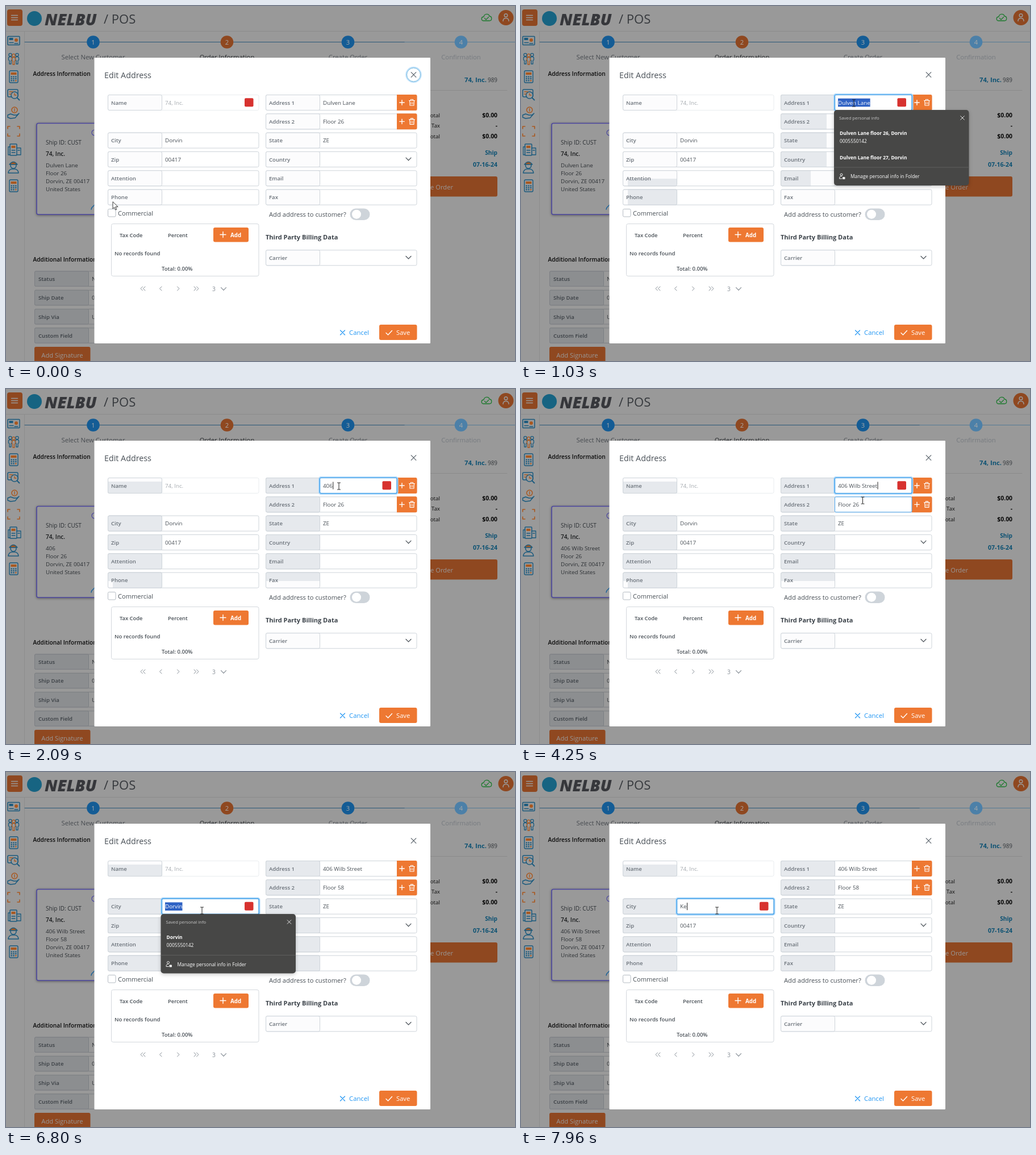
An HTML page for the animation above (8000 ms loop, 896 px wide and 625 px high).

```html
<!DOCTYPE html>
<html lang="en">
<head>
<meta charset="utf-8">
<title>Edit Address</title>
<style>
html, body { margin: 0; width: 100%; height: 100%; overflow: hidden; background: #999; }
svg { display: block; width: 896px; height: 625px; }
text { font-family: "Open Sans", "Noto Sans", sans-serif; white-space: pre; }
.popup { filter: drop-shadow(0 2px 3px rgba(0, 0, 0, .22)); }
</style>
</head>
<body>
<svg id="stage" viewBox="0 0 896 625"></svg>
<script>
const LOOP = 8000;
const ORANGE = '#ee7832', DIM_ORANGE = '#8f4820', DIM_BLUE = '#145c95', LINK = '#0d5273';
const ICON_BLUE = '#1a5a7e', ICON_ORANGE = '#a9581f';
const INK = '#495057', DIM_INK = '#2c3034', DIM_WHITE = '#999', EDGE = '#ced4da';
const COMPANY = '74, Inc.', CITY = 'Dorvin', STREET = 'Dulven Lane', PHONE = '0005550142';

const rect = (x, y, w, h, fill, stroke = 'none', r = 0, extra = '') =>
  `<rect x="${x}" y="${y}" width="${w}" height="${h}" rx="${r}" fill="${fill}" stroke="${stroke}" ${extra}/>`;
const circle = (x, y, r, fill, stroke = 'none', w = 1) =>
  `<circle cx="${x}" cy="${y}" r="${r}" fill="${fill}" stroke="${stroke}" stroke-width="${w}"/>`;
const path = (d, stroke, w = 1, fill = 'none') =>
  `<path d="${d}" stroke="${stroke}" stroke-width="${w}" fill="${fill}" stroke-linecap="round" stroke-linejoin="round"/>`;
const text = (x, y, str, size = 9.8, fill = INK, weight = 400, anchor = 'start', extra = '') =>
  `<text x="${x}" y="${y}" font-size="${size}" fill="${fill}" font-weight="${weight}" text-anchor="${anchor}" ${extra}>${str}</text>`;
const cross = (x, y, r, color, w = 1.2) =>
  path(`M${x - r} ${y - r}l${2 * r} ${2 * r}m0 ${-2 * r}l${-2 * r} ${2 * r}`, color, w);
const plus = (x, y, r, color, w = 1.4) =>
  path(`M${x - r} ${y}h${2 * r}M${x} ${y - r}v${2 * r}`, color, w);
const chevron = (x, y, color = INK) => path(`M${x - 4.5} ${y - 2.3}l4.5 4.6l4.5 -4.6`, color, 1.2);

// ---- page behind the dialog ----
function header() {
  const person = path('M875 26.5q0-5 5-5t5 5', DIM_WHITE, 1.5) + circle(880, 16.5, 2.8, 'none', DIM_WHITE, 1.5);
  return path('M0 44.5H896', '#8b8b8b') + path('M32.5 45V625', '#8d8d8d')
    + rect(2, 6, 27, 29, DIM_ORANGE, 'none', 4)
    + path('M9.5 16.5h11M9.5 20.5h11M9.5 24.5h11', DIM_WHITE, 1.4)
    + circle(50, 22, 13, '#176482')
    + text(68, 34, 'NELBU', 28.5, '#36373b', 800, 'start', 'font-style="italic"')
    + text(172, 31, '/ POS', 22, '#36393d')
    + path('M841 26c-5 0-5-7 0-7c1-6 9-6 10-1c5 0 5 8 0 8z', '#1b7a2c', 1.3)
    + path('M842.5 21.5l2.5 2.5l4.5-4.5', '#1b7a2c', 1.2)
    + circle(880, 20.5, 13.5, DIM_ORANGE) + person;
}

function sidebar() {
  const b = ICON_BLUE, o = ICON_ORANGE;
  const calculator = y => rect(6, y - 10, 15, 21, 'none', b, 2, 'stroke-width="1.4"')
    + rect(8.5, y - 7, 10, 4, o)
    + [0, 1, 2].map(r => [0, 1, 2].map(c => rect(8.5 + c * 3.8, y - 0.5 + r * 3.4, 2.4, 2.2, r + c === 4 ? o : b)).join('')).join('');
  const body = (x, y, c) => circle(x, y - 6, 2.6, 'none', c, 1.3)
    + path(`M${x - 3} ${y + 3}v-4q3-4 6 0v4l-1.5 1v6h-3v-6z`, c, 1.3);
  return rect(3, 53.5, 21, 15, 'none', b, 1, 'stroke-width="1.5"') + rect(5.5, 56, 7, 4, b) + circle(18, 60, 3, o)
    + path('M6 64.5h7M15 66h6', b, 1.4)
    + body(7.5, 92, b) + body(19.5, 92, b) + body(13.5, 93, o)
    + calculator(124)
    + rect(3, 147, 18, 13, 'none', b, 2, 'stroke-width="1.5"') + circle(15, 157, 6, '#999', b, 1.5)
    + path('M15 154v3h3', o, 1.4) + path('M19.5 161.5l4 4', b, 1.8) + path('M6 151h6M6 155h3', o, 1.3)
    + circle(15, 183, 5, 'none', o, 1.5) + path('M15 180.5v5', o, 1.3)
    + path('M3 192l5-2l6 2h5l4-3l-7 8l-8 1l-5-2z', b, 1.4)
    + path('M3 216v-4h4M20 212h4v4M24 225v4h-4M7 229h-4v-4', o, 1.6)
    + rect(7, 243, 12, 20, 'none', b, 1, 'stroke-width="1.5"') + rect(9.5, 246, 7, 4, o)
    + path('M7 248H4v14h3M19 250h7v12h-7M21 254h3M10 254h6M10 258h6', b, 1.3)
    + circle(13, 281, 5, 'none', b, 1.5) + path('M6 279q7-9 14 0z', b, 1.3, o) + path('M4 294q1-8 9-7q8-1 9 7z', b, 1.5)
    + calculator(316);
}

function steps() {
  const names = [[153.5, 'Select New Customer', '#474b50'], [389, 'Order Information', '#25282b'],
    [602, 'Create Order', '#53575c'], [801, 'Confirmation', '#777b80']];
  return path('M33 63.5H702', '#2b5878') + path('M702 63.5H896', '#567a94')
    + names.map(([x, name, color], i) => circle(x, 63.5, 11.3, [DIM_BLUE, DIM_ORANGE, DIM_BLUE, '#4c80a8'][i])
      + text(x, 67.5, i + 1, 11.2, '#aaa', 400, 'middle')
      + text(x, 94, name, 11.3, color, 400, 'middle')).join('');
}

function background() {
  const rows = ['Status', 'Ship Date', 'Ship Via', 'Custom Field'].map((name, i) => {
    const y = 467 + i * 33.3;
    return rect(50.5, y, 110, 26.5, '#999', '#7c7f83', 2) + rect(50.5, y, 95, 26.5, '#8c8e90', '#7c7f83', 2)
      + text(57, y + 17, name, 9.6, '#3a3f44', 600) + text(151, y + 17, ['N', '0', 'U', ''][i], 9.8, DIM_INK);
  }).join('');
  const totals = [['Subtotal', 196, '$0.00'], ['Tax', 214, '-'], ['Total', 233, '$0.00']]
    .map(([name, y, sum]) => text(764, y, name, 9.8, '#111', 400, 'end') + text(865, y, sum, 10.4, '#080808', 700, 'end')).join('');
  return text(47.5, 122.5, 'Address Information', 10.2, '#0c0c0c', 600)
    + rect(54, 206.5, 130, 160.5, '#999', '#4b46a0', 3, 'stroke-width="1.6" style="filter:drop-shadow(0 1px 2px #0006)"')
    + circle(156, 223, 5, 'none', '#4b46a0', 1.2) + path('M150 358l1-3l6-6', '#145f99', 1.4)
    + text(70, 244, 'Ship ID: CUST', 10, DIM_INK)
    + text(70, 263.5, COMPANY, 10.1, '#16181a', 600)
    + text(70, 283.5, '', 9.8, DIM_INK, 400, 'start', 'id="card1"')
    + text(70, 297.5, '', 9.8, DIM_INK, 400, 'start', 'id="card2"')
    + text(70, 311.5, CITY + ', ZE 00417', 9.8, DIM_INK) + text(70, 325.5, 'United States', 9.8, DIM_INK)
    + text(47.5, 450, 'Additional Information', 10.2, '#0c0c0c', 600) + rows
    + rect(50, 600, 98.5, 30, DIM_ORANGE, 'none', 3) + text(99, 618.5, 'Add Signature', 11.2, DIM_WHITE, 400, 'middle')
    + text(846, 134, COMPANY, 11.2, LINK, 700, 'end') + text(865, 133.5, '989', 9.9, '#33373b', 400, 'end')
    + path('M740 148.5H882', '#8a8a8a') + totals
    + text(865, 262, 'Ship', 10.2, LINK, 700, 'end') + text(865, 282.5, '07-16-24', 10.6, LINK, 700, 'end')
    + rect(600, 300, 265, 35.5, DIM_ORANGE, 'none', 3) + text(787, 323, 'Create Order', 11.2, DIM_WHITE, 400, 'end');
}

// ---- dialog ----
const rowY = i => 156.5 + i * 33.33;
const fields = [
  { x: 179, row: 0, label: 'Name', value: COMPANY, off: true },
  { x: 179, row: 2, label: 'City', id: 'city' },
  { x: 179, row: 3, label: 'Zip', value: '00417' },
  { x: 179, row: 4, label: 'Attention' },
  { x: 179, row: 5, label: 'Phone' },
  { x: 457, row: 0, label: 'Address 1', id: 'line1', tools: true },
  { x: 457, row: 1, label: 'Address 2', id: 'line2', tools: true },
  { x: 457, row: 2, label: 'State', value: 'ZE' },
  { x: 457, row: 3, label: 'Country', menu: true },
  { x: 457, row: 4, label: 'Email' },
  { x: 457, row: 5, label: 'Fax' },
  { x: 457, row: 8.2, label: 'Carrier', menu: true }
];

const tools = y => path(`M688 ${y - .5}h33q2.5 0 2.5 2.5v23q0 2.5-2.5 2.5h-33z`, 'none', 0, ORANGE)
  + plus(697, y + 13.5, 4.2, '#fff')
  + path(`M709.5 ${y + 10}h10M712.5 ${y + 10}v-2h4v2M710.5 ${y + 10}l.5 8.5h7l.5-8.5M713 ${y + 13}v3M716 ${y + 13}v3`, '#fff', 1.1);

function fieldBox(f) {
  const y = rowY(f.row);
  return rect(f.x + .5, y, 265.5, 27, '#fff', f.off ? '#e9ecef' : EDGE, 2.5)
    + rect(f.x + .5, y, 95, 27, '#fcfcfd', EDGE, 2.5)
    + (f.row < 6 ? `<g clip-path="url(#shade)">${rect(f.x + .5, y, 95, 27, '#e6e9ed', EDGE, 2.5)}</g>` : '')
    + (f.tools ? tools(y) : '') + (f.menu ? chevron(f.x + 251.5, y + 13) : '')
    + text(f.x + 6, y + 17.2, f.label, 9.6, '#6a7179', 600)
    + (f.value ? text(f.x + 101, y + 17.2, f.value, 9.8, f.off ? '#a4a9ae' : INK) : '');
}

function dialog() {
  const pager = path('M240.5 494l-3.5 3.5l3.5 3.5M245 494l-3.5 3.5l3.5 3.5M274 494l-3.5 3.5l3.5 3.5'
    + 'M301.5 494l3.5 3.5l-3.5 3.5M331 494l3.5 3.5l-3.5 3.5M335.5 494l3.5 3.5l-3.5 3.5', '#868e96', 1)
    + text(363, 501.5, '3', 10.2, '#868e96') + chevron(383, 498, '#868e96');
  return rect(155.5, 91, 591.5, 503, '#fff', 'none', 1)
    + text(173, 126.5, 'Edit Address', 14.3, INK)
    + `<g id="ring">${circle(717.5, 121, 13, '#fff', '#c0e2fb', 2.6)}${circle(717.5, 121, 12, '#fff', '#74b7dd', 1)}</g>`
    + cross(717.5, 121, 4.3, '#5c656d')
    + fields.map(fieldBox).join('')
    + rect(179.5, 357.5, 13.5, 13.5, '#fff', '#b5bcc3', 2) + text(197, 369, 'Commercial', 11.1, INK)
    + text(463, 371, 'Add address to customer?', 11.2, INK)
    + rect(605.5, 356.5, 35, 20.5, EDGE, 'none', 10.25) + circle(617, 366.7, 8, '#fff')
    + rect(185.5, 383.5, 259.5, 92, '#fff', '#d3d8dd', 3)
    + text(200, 406.5, 'Tax Code', 9.4, INK, 600) + text(285, 406.5, 'Percent', 9.4, INK, 600)
    + rect(365, 390, 62, 25.5, ORANGE, 'none', 3) + plus(382, 402.5, 5, '#fff') + text(395, 406.5, 'Add', 9.8, '#fff', 700)
    + text(191, 439, 'No records found', 9.6, INK, 600) + text(274, 466, 'Total: 0.00%', 9.5, INK, 600) + pager
    + text(457, 411, 'Third Party Billing Data', 11, '#3b4249', 700)
    + cross(592.5, 575, 4, '#2196f3') + text(604, 579, 'Cancel', 11.3, '#2196f3')
    + rect(657, 561, 66.5, 27, ORANGE, 'none', 3) + path('M669 575.5l3.5 3.5l7-7.5', '#fff', 1.4)
    + text(687, 579, 'Save', 11.2, '#fff');
}

function popup(id, x, y, h, entries) {
  const lines = entries.map(([dy, str, weight]) => text(x + 10, y + dy, str, 8.4, '#fff', weight)).join('');
  const m = y + h - 16;
  return `<g id="${id}" class="popup">` + rect(x, y, 237.5, h, '#474746', 'none', 5)
    + text(x + 9, y + 17, 'Saved personal info', 7.7, '#c9c9c9') + cross(x + 226, y + 14, 3.3, '#e6e6e6', 1) + lines
    + path(`M${x + .5} ${y + h - 32}h236.5`, '#5e5e5e')
    + circle(x + 13, m - 3, 2, 'none', '#eee', 1) + path(`M${x + 14} ${m + 4}h-4.5q-.5-4.5 4-4.5`, '#eee', 1)
    + rect(x + 15, m + 1, 4.5, 4, '#eee', 'none', .8)
    + text(x + 29, y + h - 13, 'Manage personal info in Folder', 8.4, '#fff') + '</g>';
}

const $ = id => document.getElementById(id);
$('stage').innerHTML = '<defs><clipPath id="shade"><path id="shadePath"/></clipPath></defs>'
  + rect(0, 0, 896, 625, '#999') + header() + sidebar() + steps() + background() + dialog()
  + rect(552.5, rowY(1), 135.5, 27, 'none', '#4aa5ee', 2, 'id="hover"')
  + `<g id="focus">${rect(-.5, -1, 137.5, 29, '#fff', '#a6d5fa', 3, 'id="halo" stroke-width="3"')}`
  + rect(.5, 0, 135.5, 27, '#fff', '#2c94e4', 2, 'id="frame" stroke-width="1.2"') + '</g>'
  + rect(0, 0, 0, 14.5, '#2f62c4', 'none', 0, 'id="selection"')
  + fields.filter(f => f.id).map(f => text(f.x + 101, rowY(f.row) + 17.2, '', 9.8, INK, 400, 'start', `id="${f.id}"`)).join('')
  + rect(0, 0, 1, 13, '#222', 'none', 0, 'id="caret"')
  + rect(0, 0, 15.5, 15, '#d7322f', 'none', 2, 'id="badge"')
  + popup('popup1', 551, 183, 133, [[44, STREET + ' floor 26, ' + CITY, 700], [58, PHONE, 400], [87, STREET + ' floor 27, ' + CITY, 700]])
  + popup('popup2', 272.5, 250, 104.5, [[43.5, CITY, 700], [58, PHONE, 400]])
  + `<g id="arrow">${path('M0 0v12l2.8-2.6l2 4.6l2-.9l-2-4.5h4z', '#222', .9, '#fff')}</g>`
  + `<g id="beam">${path('M-2.5-6h2q.5 0 .5.5v11q0 .5-.5.5h-2M2.5-6h-2q-.5 0-.5.5M2.5 6h-2q-.5 0-.5-.5', '#222', 1)}</g>`;

// ---- timeline: [time, value] holds until the next entry ----
const typed = {
  line1: [[0, STREET], [1820, '4'], [1920, '40'], [2000, '406'], [2190, '406 '], [2380, '406 W'], [2570, '406 Wi'],
    [2680, '406 Wil'], [2790, '406 Wilb'], [2990, '406 Wilb '], [3080, '406 Wilb S'], [3460, '406 Wilb St'],
    [3660, '406 Wilb Str'], [3850, '406 Wilb Stre'], [3950, '406 Wilb Stree'], [4050, '406 Wilb Street']],
  line2: [[0, 'Floor 26'], [6140, 'Floor 5'], [6330, 'Floor 58']],
  city: [[0, CITY], [7750, 'K'], [7960, 'Ke']]
};
const focusAt = [[0, null], [650, 'line1'], [4690, 'line2'], [6710, 'city']];
const selectionAt = [[0, null], [840, [7, 11]], [1030, [0, 11]], [1820, null], [5670, [7, 8]], [5850, [6, 8]], [6140, null], [6710, [0, 6]], [7750, null]];
const caretOn = [[0, true], [5090, false], [5480, true]];
const cursorPath = [[0, 188, 345], [90, 188, 345], [560, 586, 171], [4060, 586, 171], [4250, 602, 197], [4600, 589, 202],
  [5480, 589, 202], [5850, 599, 203], [6709, 599, 203], [6710, 345, 244], [LOOP, 345, 244]];
const shadeAt = [[0, 'M0 0'],
  [560, 'M457 150h96v34h-96zM457 184h81v100h-81zM457 284h53v34h-53zM188 304h86v14h-86zM188 322h87v30h-87z'],
  [1820, 'M155 163h592v175h-592zM457 150h96v20h-96zM188 322h87v30h-87z'],
  [6710, 'M155 163h592v208h-592zM457 150h96v20h-96z']];

const at = (list, t) => list.filter(([time]) => time <= t).pop()[1];
const show = (id, on) => $(id).setAttribute('visibility', on ? 'visible' : 'hidden');
const put = (id, attrs) => Object.entries(attrs).forEach(([k, v]) => $(id).setAttribute(k, v));
const move = (id, x, y) => put(id, { transform: `translate(${x} ${y})` });

function cursorPos(t) {
  const tick = t < 6710 ? Math.floor((t + 4) / 94) * 94 : t;
  const i = Math.max(1, cursorPath.findIndex(k => k[0] >= tick));
  const [t0, x0, y0] = cursorPath[i - 1], [t1, x1, y1] = cursorPath[i];
  const p = (tick - t0) / (t1 - t0), e = p * p * (3 - 2 * p);
  return [x0 + (x1 - x0) * e, y0 + (y1 - y0) * e];
}

function render(t) {
  const focus = at(focusAt, t), sel = at(selectionAt, t);
  for (const id in typed) {
    $(id).textContent = at(typed[id], t);
  }
  $('card1').textContent = $('line1').textContent;
  $('card2').textContent = $('line2').textContent;

  const f = fields.find(field => field.id === focus) || fields[0];
  const left = f.x + 95, y = rowY(f.row), w = f.tools ? 135.5 : 170.5;
  move('focus', left, y);
  put('halo', { width: w + 2 });
  put('frame', { width: w });
  move('badge', f.tools ? 662.5 : 420, y + 5.7);
  show('focus', focus);
  show('ring', !focus);

  const offset = n => n ? $(focus).getSubStringLength(0, n) : 0;
  show('selection', focus && sel);
  show('caret', focus && !sel && at(caretOn, t));
  if (focus) {
    const value = $(focus).textContent;
    if (sel) {
      const x = offset(sel[0]);
      put('selection', { x: f.x + 101 + x, y: y + 6.3, width: offset(sel[1]) - x });
      $(focus).innerHTML = `${value.slice(0, sel[0])}<tspan fill="#fff">${value.slice(...sel)}</tspan>${value.slice(sel[1])}`;
    } else {
      const index = focus === 'line2' && t < 6140 ? 7 : value.length;
      put('caret', { x: f.x + 101.5 + offset(index), y: y + 7 });
    }
  }

  show('hover', t >= 4150 && t < 4690);
  show('popup1', t >= 750 && t < 1820);
  show('popup2', t >= 6710 && t < 7750);
  put('shadePath', { d: at(shadeAt, t) });

  const [cx, cy] = cursorPos(t), overInput = t >= 500;
  move('arrow', cx, cy);
  move('beam', cx, cy);
  show('arrow', !overInput);
  show('beam', overInput);
}

function frame() {
  render(performance.now() % LOOP);
  requestAnimationFrame(frame);
}
frame();
</script>
</body>
</html>
```
